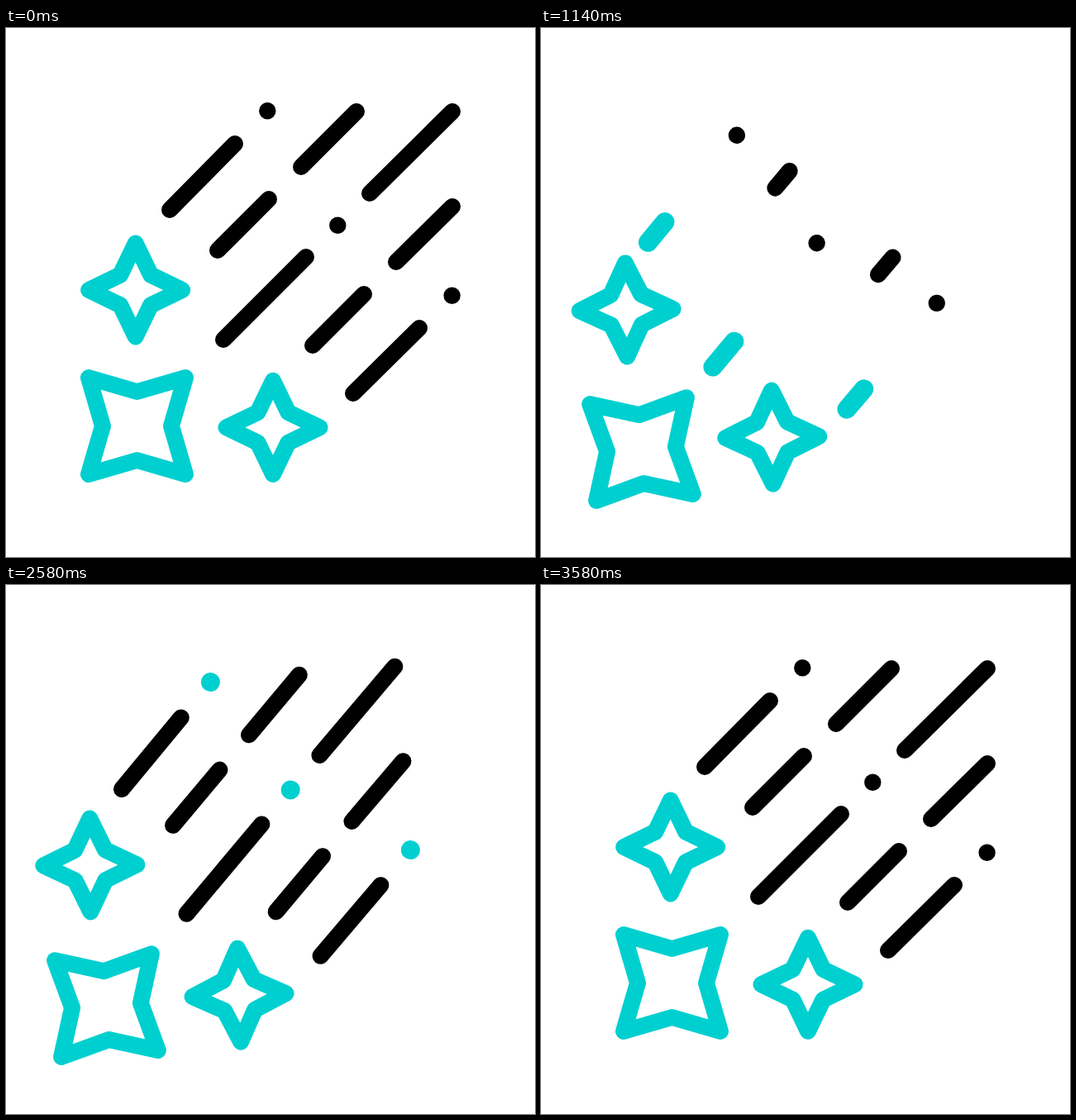
These frames come from a looping animation (640x640 px, 3.6 s). An HTML page:

```html
<!DOCTYPE html>
<html lang="en">
<head>
<meta charset="utf-8">
<title>Shooting stars</title>
<style>
  html, body { margin: 0; width: 100%; height: 100%; overflow: hidden; background: #fff; }
  svg { display: block; width: 100vw; height: 100vh; }
  path, line { fill: none; stroke-width: 20; stroke-linecap: round; stroke-linejoin: round; }
</style>
</head>
<body>
<svg viewBox="0 0 640 640"><g id="trails"></g><g id="stars"></g></svg>
<script>
const LOOP = 3600, TEAL = '#00cfd0', BLACK = '#000';
const PIVOT = { x: 186, y: 460 };
const trails = document.getElementById('trails');
const starBox = document.getElementById('stars');

// Lower end, upper end, starts in the second wave, turns teal
const lines = [
  [198, 220, 277, 140, 0, 1],
  [256, 269, 318, 207, 1, 0],
  [357, 168, 424, 101, 0, 0],
  [440, 200, 540, 101, 1, 1],
  [263, 377, 363, 277, 0, 1],
  [472, 283, 540, 216, 0, 0],
  [371, 384, 433, 322, 1, 0],
  [420, 442, 500, 363, 0, 1]
].map(([x1, y1, x2, y2, late, tints]) =>
  ({ x1, y1, x2, y2, late, tints, el: add(trails, 'line') }));

const dots = [[316.3, 100.3], [401.3, 238.7], [539.6, 323.7]].map(([cx, cy]) =>
  add(trails, 'circle', { cx, cy }));

// Swing phase in degrees over time
const swing = [[270, 0], [740, 348], [1520, 891], [1980, 1255], [2580, 1710], [2900, 1943], [3440, 2340]];
const wobbleA = [[180, -180], [740, 241], [1520, 740], [1980, 1008], [2580, 1562], [2900, 1842], [3560, 2340]];
const wobbleB = [[180, -180], [740, 189], [1520, 778], [1980, 1060], [2580, 1592], [2900, 1842], [3560, 2340]];

const big = star(158.5, 481.5, 58.5, 41.5, 45);
const small = [
  { ...star(156.7, 317, 56.5, 26, 0), phase: wobbleA },
  { ...star(323, 483.3, 56.5, 26, 0), phase: wobbleB }
];

function add(parent, tag, attrs = {}) {
  const el = document.createElementNS('http://www.w3.org/2000/svg', tag);
  set(el, attrs);
  return parent.appendChild(el);
}

function set(el, attrs) {
  for (const k in attrs) el.setAttribute(k, attrs[k]);
}

function star(x, y, reach, notch, turn) {
  const tip = turn ? reach * Math.SQRT2 : reach;
  const pts = Array.from({ length: 8 }, (_, i) => {
    const a = (turn + i * 45) * Math.PI / 180, r = i % 2 ? notch : tip;
    return (r * Math.cos(a)).toFixed(2) + ' ' + (r * Math.sin(a)).toFixed(2);
  });
  return { x, y, el: add(starBox, 'path', { d: 'M' + pts.join('L') + 'Z', stroke: TEAL }) };
}

const clamp = v => Math.max(0, Math.min(1, v));

function ease(t, from, to) {
  const p = clamp((t - from) / (to - from));
  return p * p * (3 - 2 * p);
}

function wave(table, t) {
  let i = 1;
  while (i < table.length - 1 && t > table[i][0]) i++;
  const [t0, a] = table[i - 1], [t1, b] = table[i];
  return Math.sin((a + (b - a) * clamp((t - t0) / (t1 - t0))) * Math.PI / 180);
}

function place(el, x, y, deg) {
  el.setAttribute('transform', `translate(${x} ${y}) rotate(${deg})`);
}

function draw(t) {
  const level = clamp((t - 180) / 430) * clamp((3560 - t) / 400);
  const tilt = 5 * level * wave(swing, t);
  const go = ease(t, 300, 1040);
  const dx = -37 * go * (1 - ease(t, 2740, 3440));
  const dy = 28 * go * (1 - ease(t, 2480, 3440));

  // Trails drop back along the diagonal, then catch up
  const lag = ease(t, 250, 850) * (1 - ease(t, 850, 1300));
  trails.setAttribute('transform',
    `translate(${dx - 37 * lag} ${dy + 40 * lag}) rotate(${tilt} ${PIVOT.x} ${PIVOT.y})`);

  const tealLines = (t >= 1000 && t < 2320) || (t >= 2740 && t < 3180);
  const tealDots = t >= 2320 && t < 2740;

  for (const l of lines) {
    const wait = l.late * 400;
    const back = t >= 1000 + wait;
    const from = back ? 0 : ease(t, 180 + wait, 580 + wait);
    const to = back ? ease(t, 1000 + wait, 1400 + wait) : 1;
    const at = p => [l.x1 + (l.x2 - l.x1) * p, l.y1 + (l.y2 - l.y1) * p];
    const [x1, y1] = at(from), [x2, y2] = at(to);
    const teal = l.tints && tealLines;
    set(l.el, { x1, y1, x2, y2, stroke: teal ? TEAL : BLACK });
    l.el.style.strokeWidth = teal ? 23 : 20;
    l.el.style.display = to - from > 0.002 ? '' : 'none';
  }
  for (const d of dots) set(d, { r: tealDots ? 11.5 : 10.2, fill: tealDots ? TEAL : BLACK });

  // Small stars orbit the big one and add a wobble of their own
  const turn = 0.78 * tilt;
  const c = Math.cos(turn * Math.PI / 180), s = Math.sin(turn * Math.PI / 180);
  place(big.el, big.x + dx, big.y + dy, turn);
  for (const k of small) {
    const own = 4 * level * wave(k.phase, t);
    const rx = k.x - big.x, ry = k.y - big.y;
    place(k.el,
      big.x + dx + rx * c - ry * s - 2 * own,
      big.y + dy + rx * s + ry * c - 1.7 * own,
      turn + own);
  }
}

const start = performance.now();
function tick(now) {
  draw(Math.max(0, now - start) % LOOP);
  requestAnimationFrame(tick);
}
draw(0);
requestAnimationFrame(tick);
</script>
</body>
</html>
```
